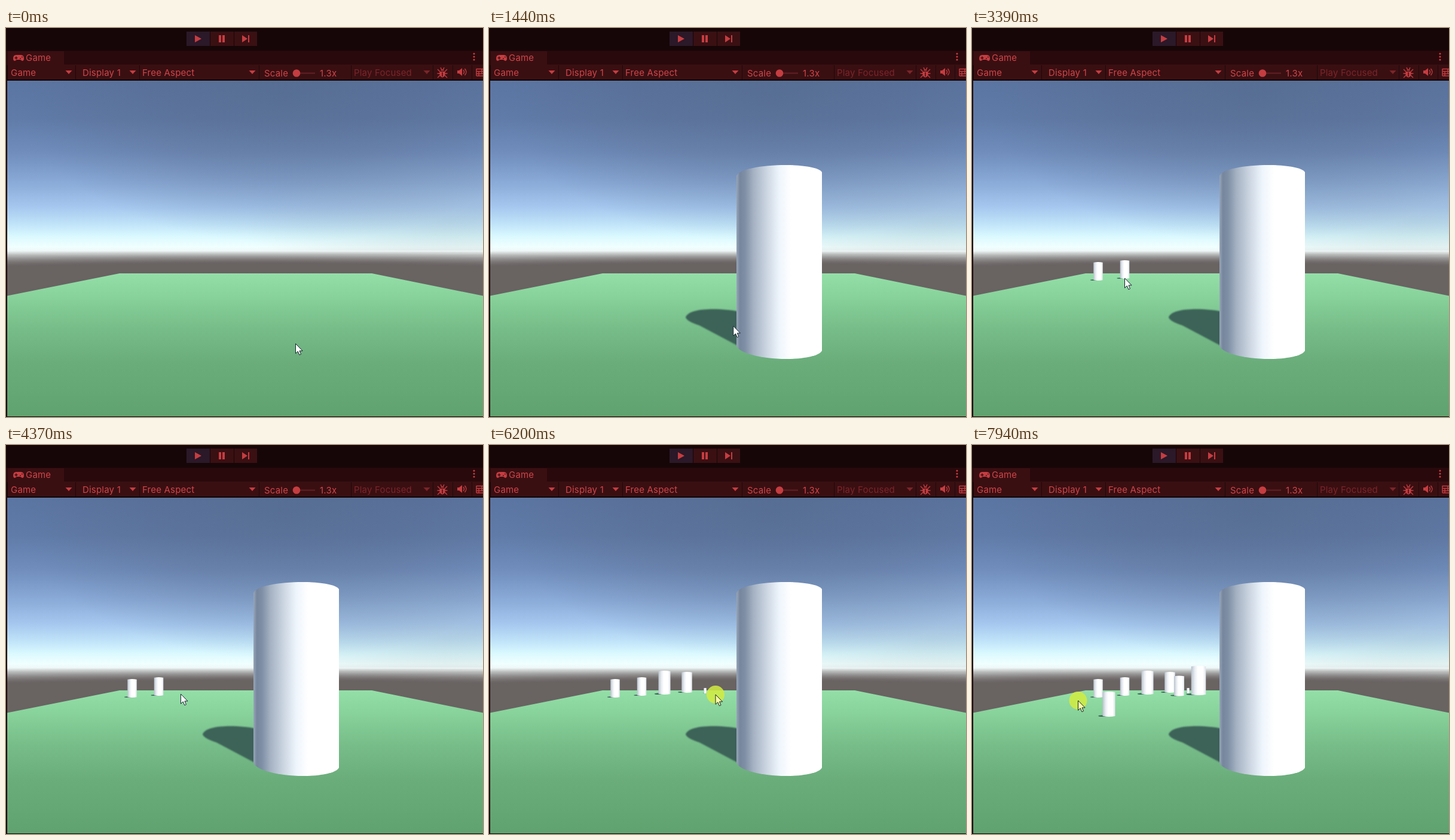
An HTML page for the animation above (8000 ms loop, 798 by 650 pixels).

```html
<!DOCTYPE html>
<html lang="en">
<head>
<meta charset="utf-8">
<title>Cylinder placement</title>
<style>
html, body { margin: 0; width: 100%; height: 100%; overflow: hidden; background: #170607; }
svg { display: block; width: 100vw; height: 100vh; }
text { font: 15px Inter, Roboto, sans-serif; letter-spacing: .2px; fill: #cf4549; }
.off { fill: #7b2529; }
.icon { fill: #c53d41; }
.line { fill: none; stroke: #c53d41; stroke-width: 1.4; }
.cut { fill: none; stroke: #3a0f12; stroke-width: 1.5; }
</style>
</head>
<body>
<svg viewBox="0 0 798 650">
  <defs>
    <linearGradient id="sky" gradientUnits="userSpaceOnUse" x1="0" y1="88" x2="0" y2="374">
      <stop offset="0" stop-color="#5b75a2"/>
      <stop offset=".22" stop-color="#607ba8"/>
      <stop offset=".42" stop-color="#708dbc"/>
      <stop offset=".6" stop-color="#8babd8"/>
      <stop offset=".74" stop-color="#a6c8ef"/>
      <stop offset=".84" stop-color="#c1e4f9"/>
      <stop offset=".91" stop-color="#daf9ff"/>
      <stop offset=".97" stop-color="#f0ffff"/>
      <stop offset="1" stop-color="#eef6f6"/>
    </linearGradient>
    <radialGradient id="dusk" gradientUnits="userSpaceOnUse" cx="0" cy="0" r="1"
      gradientTransform="translate(470 110) scale(450 250)">
      <stop offset="0" stop-color="#526481" stop-opacity=".45"/>
      <stop offset=".5" stop-color="#526481" stop-opacity=".28"/>
      <stop offset="1" stop-color="#526481" stop-opacity="0"/>
    </radialGradient>
    <radialGradient id="haze" gradientUnits="userSpaceOnUse" cx="0" cy="0" r="1"
      gradientTransform="translate(740 325) scale(340 125)">
      <stop offset="0" stop-color="#8b999c" stop-opacity=".22"/>
      <stop offset="1" stop-color="#8b999c" stop-opacity="0"/>
    </radialGradient>
    <linearGradient id="grass" gradientUnits="userSpaceOnUse" x1="0" y1="410" x2="0" y2="650">
      <stop offset="0" stop-color="#93dfa7"/>
      <stop offset=".16" stop-color="#88d29b"/>
      <stop offset=".38" stop-color="#77bd89"/>
      <stop offset=".62" stop-color="#6aad7b"/>
      <stop offset="1" stop-color="#60a26f"/>
    </linearGradient>
    <linearGradient id="near">
      <stop offset="0" stop-color="#98a6b8"/>
      <stop offset=".04" stop-color="#76869d"/>
      <stop offset=".1" stop-color="#7f8fa5"/>
      <stop offset=".2" stop-color="#a5b2c3"/>
      <stop offset=".35" stop-color="#cbd5e1"/>
      <stop offset=".5" stop-color="#eef5fc"/>
      <stop offset=".64" stop-color="#fff"/>
    </linearGradient>
    <linearGradient id="far">
      <stop offset="0" stop-color="#b9c2cc"/>
      <stop offset=".25" stop-color="#eaeef3"/>
      <stop offset=".45" stop-color="#fff"/>
      <stop offset=".8" stop-color="#fff"/>
      <stop offset="1" stop-color="#dfe4ea"/>
    </linearGradient>
    <filter id="soft"><feGaussianBlur stdDeviation="1"/></filter>
  </defs>

  <rect width="798" height="650" fill="#170607"/>
  <path d="M0 38H798V62H0Z" fill="#29090c"/>
  <path d="M3 39H97V62H3ZM3 61H798V86H3Z" fill="#3a0f12"/>
  <path d="M0 62H1V650H0Z" fill="#2a0a0d"/>

  <g id="bar">
    <path d="M302 6H341V30H302Z" fill="#2b1828"/>
    <path d="M342 6H381V30H342ZM382 6H420V30H382Z" fill="#3a1013"/>
    <path class="icon" d="M316 12L327 18 316 24ZM356 12H360V24H356ZM362 12H366V24H362ZM395 12L404 18 395 24ZM405 12H407V24H405Z"/>
    <text x="33" y="55">Game</text>
    <text x="8" y="80">Game</text>
    <text x="128" y="80">Display 1</text>
    <text x="228" y="80">Free Aspect</text>
    <text x="432" y="81">Scale</text>
    <text x="525" y="81">1.3x</text>
    <text x="582" y="80" class="off">Play Focused</text>
    <path d="M480 74.5H517V76.5H480Z" fill="#632024"/>
    <circle class="icon" cx="486" cy="75.5" r="6.3"/>
    <path class="icon" d="M17 45H25Q30 45 30 51 30 55 27 55L24 53H18L15 55Q12 55 12 51 12 45 17 45Z"/>
    <path class="cut" d="M14.5 50h5M17 47.5v5M23 51h1.8M26 48.5h1.8"/>
    <ellipse class="icon" cx="730" cy="76" rx="4.8" ry="6.5"/>
    <path class="line" d="M727 66l2 4M733 66l-2 4M722 69l4 4M738 69l-4 4M721.5 76h17M722 83l4-4M738 83l-4-4"/>
    <path class="cut" d="M726 72h8M730 74v7"/>
    <path class="icon" d="M755 71h3l5-4v13l-5-4h-3Z"/>
    <path class="line" d="M765 70q3 3.5 0 7M767.5 68q5 5.5 0 11"/>
    <path class="line" d="M787 68.5h13M787 72.5h13M787 76.5h13M787 80h13M787 68v12M791 72v8M796 68v8"/>
  </g>

  <rect x="2" y="88" width="796" height="320" fill="url(#sky)"/>
  <rect x="2" y="88" width="796" height="320" fill="url(#dusk)"/>
  <rect x="2" y="88" width="796" height="320" fill="url(#haze)"/>
  <g id="horizon"></g>
  <path d="M190 410H612L798 447.5V649H2V447.5Z" fill="url(#grass)"/>
  <path d="M1 87H798M1.5 87V650M2 649.5H798" fill="none" stroke="#0c0505"/>

  <g id="solids"></g>
  <g id="big">
    <path d="M329 483C336 466 390 468 420 474V533L352 497Q330 490 329 483Z" fill="#3d6259" filter="url(#soft)"/>
    <path d="M414 247C418 236 455 229 497 229C528 229 554 234 557 241V539C554 547 530 553 497 553C455 553 418 543 414 531Z" fill="url(#near)"/>
  </g>
  <g id="pointer">
    <circle id="ring" r="15" fill="#d2ec40" fill-opacity=".85"/>
    <path id="arrow" d="M0 0V16.3L3.8 12.8 6.4 18.8 9 17.6 6.5 11.9H11.6Z" stroke="#10202a"/>
  </g>
</svg>
<script>
const $ = id => document.getElementById(id);
const LOOP = 8000, STEP = 69.4;
const HOLD = 140;   // length of a click; its cylinder appears on release
const REST = 200;   // pause between arriving and clicking
const LEAD = 1040;  // longest time from setting off to clicking

// Each click: when, where, and how tall a cylinder it leaves there
const clicks = [
  { at: 480, x: 484.5, y: 527.5 },
  { at: 2130, x: 211, y: 421, h: 31 },
  { at: 3180, x: 255.5, y: 418, h: 31 },
  { at: 4650, x: 293.5, y: 416, h: 40 },
  { at: 5060, x: 331, y: 413, h: 35 },
  { at: 5620, x: 361.5, y: 414, h: 9 },
  { at: 6200, x: 379, y: 417, h: 49 },
  { at: 6890, x: 346.5, y: 418.5, h: 34 },
  { at: 7460, x: 229, y: 453, h: 42 },
  { at: 7930, x: 177.5, y: 427 }
];

function add(parent, tag, attrs) {
  const el = document.createElementNS('http://www.w3.org/2000/svg', tag);
  for (const k in attrs) el.setAttribute(k, attrs[k]);
  return parent.appendChild(el);
}

function buildBar() {
  const bar = $('bar');
  for (const x of [116, 223, 423, 577, 714, 747, 779]) add(bar, 'path', { d: `M${x} 62h1v24h-1Z`, fill: '#1f080a' });
  for (const x of [105, 212, 412, 704])
    add(bar, 'path', { d: `M${x - 5.5} 71h11l-5.5 6Z`, class: x > 700 ? 'off' : 'icon' });
  for (let y = 43; y <= 53; y += 5) add(bar, 'circle', { cx: 783, cy: y, r: 1.6, class: 'icon' });
}

// Curved bands that fade from bright haze to the dark lower sky
function buildHorizon() {
  const top = 372, rows = 22;
  for (let i = 0; i <= rows; i++) {
    const y = top + i, sag = i * .22, glow = (1 - i / rows) ** 1.7;
    const [r, g, b] = [[105, 133], [99, 147], [98, 148]].map(([base, gain]) => base + gain * glow);
    add($('horizon'), 'path', {
      d: `M2 ${y + sag}Q400 ${y - sag} 798 ${y + sag}V450H2Z`,
      fill: `rgb(${r},${g},${b})`
    });
  }
}

// A cylinder standing on the clicked point, half as wide as tall
function cylinder({ x, y, h }) {
  const g = add($('solids'), 'g', {});
  const w = h / 2, left = x - w / 2, right = x + w / 2, r = w * .045, foot = y + 1, top = foot - h;
  add(g, 'ellipse', { cx: left, cy: foot - h * .03, rx: w * .35, ry: h * .03, fill: '#3d6259' });
  add(g, 'path', {
    d: `M${left} ${top + r}Q${x} ${top - r} ${right} ${top + r}V${foot - r}Q${x} ${foot + r} ${left} ${foot - r}Z`,
    fill: 'url(#far)'
  });
  return g;
}

buildBar();
buildHorizon();
clicks[0].solid = $('big');
for (const c of clicks) if (c.h) c.solid = cylinder(c);

function pointerAt(t) {
  let { x, y } = clicks[0];
  for (let i = 1; i < clicks.length; i++) {
    const c = clicks[i], from = Math.max(clicks[i - 1].at + HOLD, c.at - LEAD);
    const f = Math.min(1, Math.max(0, (t - from) / (c.at - REST - from)));
    const ease = f * f * (3 - 2 * f);
    x += (c.x - x) * ease;
    y += (c.y - y) * ease;
  }
  return [x, y];
}

const show = (el, on) => { el.style.display = on ? '' : 'none'; };

function draw(t) {
  const held = (Math.floor(t / STEP + .2) - .1) * STEP;
  const down = clicks.some(c => t >= c.at && t < c.at + HOLD);
  for (const c of clicks) if (c.solid) show(c.solid, t >= c.at + HOLD - 10);
  show($('ring'), down);
  $('arrow').setAttribute('fill', down ? '#fbfca8' : '#fff');
  $('pointer').setAttribute('transform', `translate(${pointerAt(held)})`);
}

const start = performance.now();
function tick() {
  draw((performance.now() - start) % LOOP);
  requestAnimationFrame(tick);
}
tick();
</script>
</body>
</html>
```
